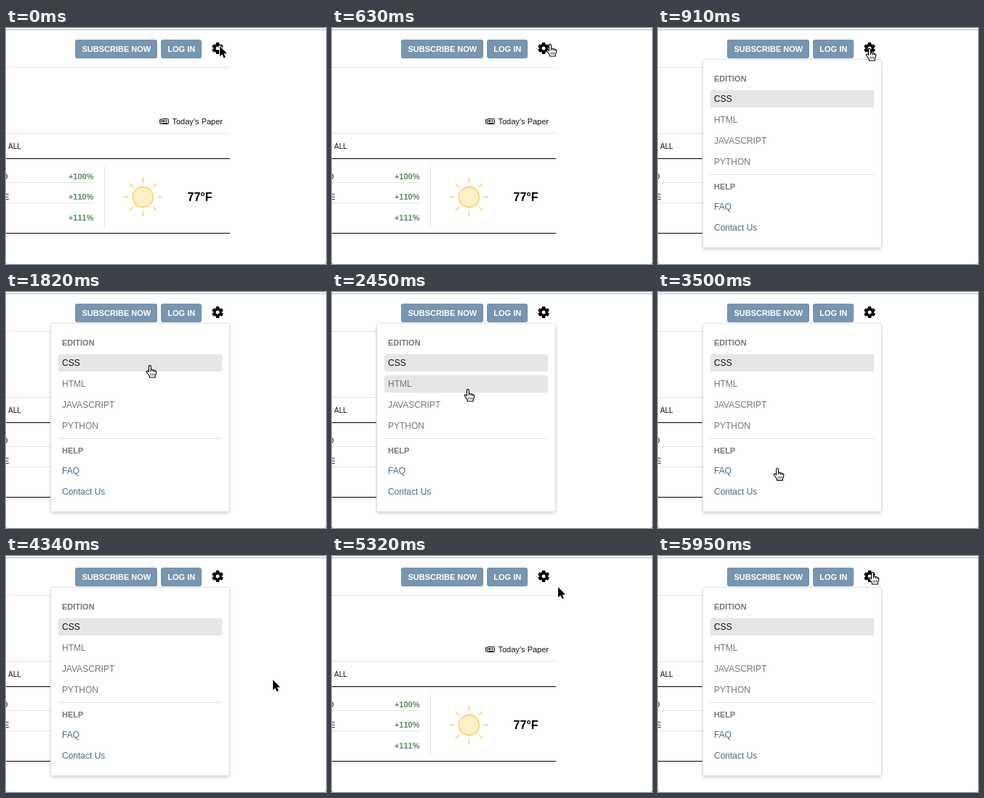
An HTML page with a canvas for the animation above (6020 ms loop, 440 by 326 pixels).

```html
<!DOCTYPE html>
<html lang="en">
<head>
<meta charset="utf-8">
<title>Settings menu</title>
<style>
html, body { margin: 0; width: 100%; height: 100%; overflow: hidden; background: #fff; }
canvas { display: block; }
</style>
</head>
<body>
<canvas id="stage" width="440" height="326"></canvas>
<script>
const ctx = document.getElementById('stage').getContext('2d');
const LOOP = 6020, STEP = 70;
const FONT = '"Liberation Sans", Arial, sans-serif';
const ROWS = ['CSS', 'HTML', 'JAVASCRIPT', 'PYTHON'];

// Pointer hot spot: time, x, y
const PATH = [
  [0, 294, 25], [630, 300, 22], [770, 300, 22], [910, 291, 28], [1260, 291, 28],
  [1820, 198, 101], [1890, 198, 101], [2100, 190, 108], [2170, 190, 108],
  [2450, 187, 134], [2800, 181, 165], [2940, 175, 183], [3430, 165, 238],
  [3920, 160, 274], [4060, 160, 274], [4130, 195, 262], [4200, 238, 246],
  [4270, 238, 246], [4340, 367, 171], [4970, 367, 171], [5040, 349, 142],
  [5110, 349, 142], [5320, 311, 43], [5600, 295, 22], [LOOP, 295, 22]
];

const within = (t, spans) => spans.some(([from, to]) => t >= from && t < to);
const menuOpen = t => within(t, [[840, 4760], [5810, LOOP]]);
const pressed = t => within(t, [[700, 840], [4620, 4760], [5600, 5740]]);

function pointerAt(t) {
  const i = PATH.findIndex(key => key[0] > t);
  const [t0, x0, y0] = PATH[i - 1], [t1, x1, y1] = PATH[i];
  const k = (t - t0) / (t1 - t0);
  return { x: x0 + (x1 - x0) * k, y: y0 + (y1 - y0) * k };
}

function text(str, x, y, size, color, bold = false, align = 'left') {
  ctx.font = `${bold ? 'bold ' : ''}${size}px ${FONT}`;
  ctx.fillStyle = color;
  ctx.textAlign = align;
  ctx.fillText(str, x, y);
}

function rect(x, y, w, h, color) {
  ctx.fillStyle = color;
  ctx.fillRect(x, y, w, h);
}

function rounded(x, y, w, h, r, color) {
  ctx.beginPath();
  ctx.roundRect(x, y, w, h, r);
  ctx.fillStyle = color;
  ctx.fill();
}

function circle(x, y, r, fill) {
  ctx.beginPath();
  ctx.arc(x, y, r, 0, 7);
  ctx.fillStyle = fill;
  ctx.fill();
}

function at(x, y, draw) {
  ctx.save();
  ctx.translate(x, y);
  draw();
  ctx.restore();
}

function drawGear() {
  at(291, 28, () => {
    circle(0, 0, 5.8, '#000');
    for (let i = 0; i < 6; i++) {
      ctx.beginPath();
      ctx.moveTo(-2.7, -5);
      ctx.lineTo(-1.9, -7.9);
      ctx.lineTo(1.9, -7.9);
      ctx.lineTo(2.7, -5);
      ctx.fill();
      ctx.rotate(Math.PI / 3);
    }
    circle(0, 0, 2.5, '#fff');
  });
}

function drawSun() {
  at(188.3, 233.5, () => {
    circle(0, 0, 14, '#fdf0c6');
    ctx.strokeStyle = '#f2d974';
    ctx.lineWidth = 1.8;
    ctx.stroke();
    for (let i = 0; i < 8; i++) {
      ctx.beginPath();
      ctx.moveTo(19.5, 0);
      ctx.lineTo(26.5, 0);
      ctx.stroke();
      ctx.rotate(Math.PI / 4);
    }
  });
}

function drawNewspaper() {
  ctx.strokeStyle = '#111';
  ctx.lineWidth = 1;
  ctx.beginPath();
  ctx.roundRect(213.5, 125.5, 10, 7, 1);
  ctx.moveTo(213, 126.5);
  ctx.lineTo(211.5, 126.5);
  ctx.lineTo(211.5, 131.5);
  ctx.quadraticCurveTo(211.5, 132.5, 213.5, 132.5);
  ctx.stroke();
  ctx.strokeRect(215.5, 127.5, 2, 2);
  rect(219, 127, 3, 1, '#111');
  rect(219, 129, 3, 1, '#111');
  rect(215, 131, 7, 1, '#111');
}

function drawHeader() {
  rect(0, 0, 440, 2, '#f6f8f8');
  rect(0, 2, 440, 1, '#b7c6ca');
  rounded(95, 16, 113, 26, 3, '#7895b1');
  rounded(213, 16, 56, 26, 3, '#7895b1');
  text('SUBSCRIBE NOW', 104.5, 33, 11, '#fff', true);
  text('LOG IN', 222.3, 33, 11, '#fff', true);
  drawGear();
}

function drawPage() {
  rect(0, 54, 308, 1, '#e2e2e2');
  drawNewspaper();
  text('Today’s Paper', 228.5, 133, 11, '#111');
  rect(0, 145, 308, 1, '#e2e2e2');
  text('ALL', 3, 167, 10, '#111');
  rect(0, 180, 308, 1, '#000');
  text('D', 2.5, 209, 10, '#111', false, 'right');
  text('E', 4.5, 237, 10, '#111', false, 'right');
  ctx.fontKerning = 'none';
  ['+100%', '+110%', '+111%'].forEach((gain, i) =>
    text(gain, 120.5, [209, 237, 266][i], 11, '#568a5b', true, 'right'));
  ctx.fontKerning = 'auto';
  rect(0, 213, 121, 1, '#e2e2e2');
  rect(0, 241, 121, 1, '#e2e2e2');
  rect(135, 191, 1, 85, '#e2e2e2');
  drawSun();
  text('77°F', 249.5, 239, 16, '#000', true);
  rect(0, 283, 308, 1, '#000');
  for (const x of [0, 439]) rect(x, 325, 1, 1, '#777');
}

function drawMenu(pointer) {
  ctx.save();
  ctx.shadowColor = 'rgba(0,0,0,.2)';
  ctx.shadowBlur = 4;
  ctx.shadowOffsetY = 2;
  rounded(61.5, 43.5, 246, 260, 3, '#fff');
  ctx.restore();
  ctx.strokeStyle = '#dedede';
  ctx.lineWidth = 1;
  ctx.stroke();

  text('EDITION', 77, 74, 11, '#777', true);
  ROWS.forEach((name, i) => {
    const top = 86 + i * 29;
    const hovered = pointer.x < 297 && pointer.y >= top && pointer.y < top + 24;
    if (i === 0 || hovered) rounded(72, top, 225, 24, 3, '#e7e5e6');
    text(name, 77, top + 16, 12, i ? '#777' : '#111');
  });
  rect(72, 202, 225, 1, '#e2e2e2');
  text('HELP', 77, 223, 11, '#777', true);
  text('FAQ', 77, 251, 12, '#4c6c88');
  text('Contact Us', 77, 280, 12, '#4c6c88');
}

const ARROW = new Path2D('M0 0V14.2L3.3 11.2L5.4 16.2L7.8 15.2L5.7 10.3H10Z');
const HAND = new Path2D(
  'M-1.6 9.6V1.6Q-1.5 .4-.2 .4Q1.2 .4 1.3 1.6V6.4Q3.4 5.4 4 7Q5.8 6.2 6.4 7.8' +
  'Q8.6 7.4 8.6 9.6Q8.6 12.4 7.2 14.4V17H-.8V15Q-2.4 13-4.6 9.8Q-5.4 8.2-3.8 8Q-2.6 8-1.6 9.6Z' +
  'M1.3 6.4V9M4 7V9.3M6.4 7.8V9.6');
const CREASES = new Path2D('M1 11.5V14.5M3.2 11.5V14.5M5.4 11.5V14.5');

function drawPointer(p, hand) {
  at(p.x, p.y, () => {
    ctx.lineJoin = 'round';
    if (hand) {
      ctx.fillStyle = '#fff';
      ctx.fill(HAND);
      ctx.strokeStyle = '#000';
      ctx.lineWidth = 1.1;
      ctx.stroke(HAND);
      ctx.lineWidth = 0.8;
      ctx.stroke(CREASES);
    } else {
      ctx.strokeStyle = '#fff';
      ctx.lineWidth = 2;
      ctx.stroke(ARROW);
      ctx.fillStyle = '#000';
      ctx.fill(ARROW);
    }
  });
}

function drawPress(p) {
  ctx.beginPath();
  ctx.arc(p.x, p.y, 20.5, 0, 7);
  ctx.strokeStyle = 'rgba(90,90,90,.6)';
  ctx.lineWidth = 1.5;
  ctx.stroke();
}

function render(t) {
  const pointer = pointerAt(t), open = menuOpen(t);
  const overGear = t >= 2 * STEP && Math.hypot(pointer.x - 291, pointer.y - 28) < 12;
  const overItem = open && pointer.x < 300 && pointer.y >= 86;

  rect(0, 0, 440, 326, '#fff');
  drawPage();
  drawHeader();
  if (open) drawMenu(pointer);
  if (pressed(t)) drawPress(pointer);
  drawPointer(pointer, overGear || overItem);
}

const start = performance.now();
function tick() {
  const t = (performance.now() - start) % LOOP;
  render(Math.floor(t / STEP) * STEP);
  requestAnimationFrame(tick);
}
tick();
</script>
</body>
</html>
```
